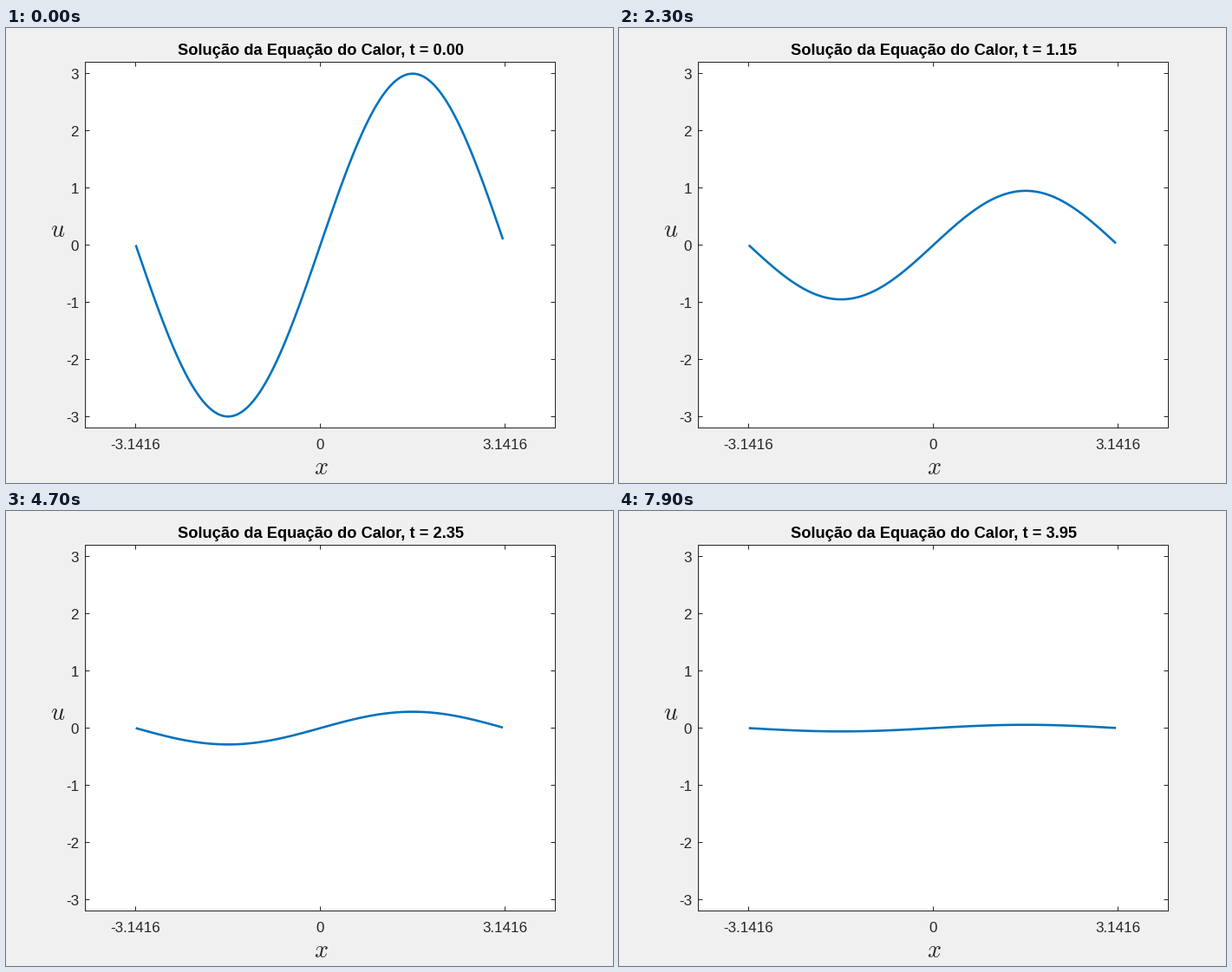
Write a matplotlib script that moves like this. It is 700x525 px and loops after 8 s.

```python
import numpy as np
import matplotlib.pyplot as plt
from matplotlib.animation import FuncAnimation
from matplotlib.patches import Rectangle

plt.rcParams["font.family"] = "Liberation Sans"
plt.rcParams["mathtext.fontset"] = "cm"

W, H, DPI = 700, 525, 100
PX = 72 / DPI                      # points per pixel
L, R, T, B = 91.5, 633.5, 39.5, 461.5
X_MAX, Y_MAX = 4, 3.2
FRAMES, DT = 80, 0.05
INK = "#262626"
TICK = 5

fig = plt.figure(figsize=(W / DPI, H / DPI), dpi=DPI, facecolor="#f0f0f0")
ax = fig.add_axes([0, 0, 1, 1])
ax.set_xlim(0, W)
ax.set_ylim(H, 0)
ax.axis("off")


def px(x):
    return (L + R) / 2 + x * (R - L) / (2 * X_MAX)


def py(u):
    return (T + B) / 2 - u * (B - T) / (2 * Y_MAX)


def rule(x0, y0, x1, y1):
    ax.plot([x0, x1], [y0, y1], color=INK, lw=PX, snap=False,
            solid_capstyle="butt", zorder=2)


def label(x, y, s, size, ha="center", color=INK, **kw):
    return ax.text(x, y, s, fontsize=size * PX, ha=ha, va="baseline",
                   color=color, **kw)


ax.add_patch(Rectangle((L, T), R - L, B - T, fc="white", ec="none", zorder=1))
for y in (T, B):
    rule(L - 0.5, y, R + 0.5, y)
for x in (L, R):
    rule(x, T, x, B)

for v, name in ((-np.pi, "-3.1416"), (0, "0"), (np.pi, "3.1416")):
    x = np.floor(px(v)) + 0.5
    rule(x, B, x, B - TICK)
    rule(x, T, x, T + TICK)
    label(x, 486, name, 17)

for v in range(-3, 4):
    y = np.floor(py(v)) + 0.5
    rule(L, y, L + TICK, y)
    rule(R, y, R - TICK, y)
    label(84, y + 6.5, str(v), 17, ha="right")

label(363, 515, "$x$", 28)
label(59.5, 241, "$u$", 28)
title = label(362.5, 31, "", 18.3, color="black", weight="bold")

xs = -np.pi + 0.05 * np.arange(126)
curve, = ax.plot([], [], color="#0072bd", lw=2.6 * PX, zorder=3,
                 solid_capstyle="butt", solid_joinstyle="round")


def update(i):
    t = i * DT
    curve.set_data(px(xs), py(3 * np.exp(-t) * np.sin(xs)))
    title.set_text(f"Solução da Equação do Calor, t = {t:.2f}")
    return curve, title


anim = FuncAnimation(fig, update, frames=FRAMES, init_func=lambda: update(0),
                     interval=100, repeat=True, repeat_delay=0)
plt.show()
```
